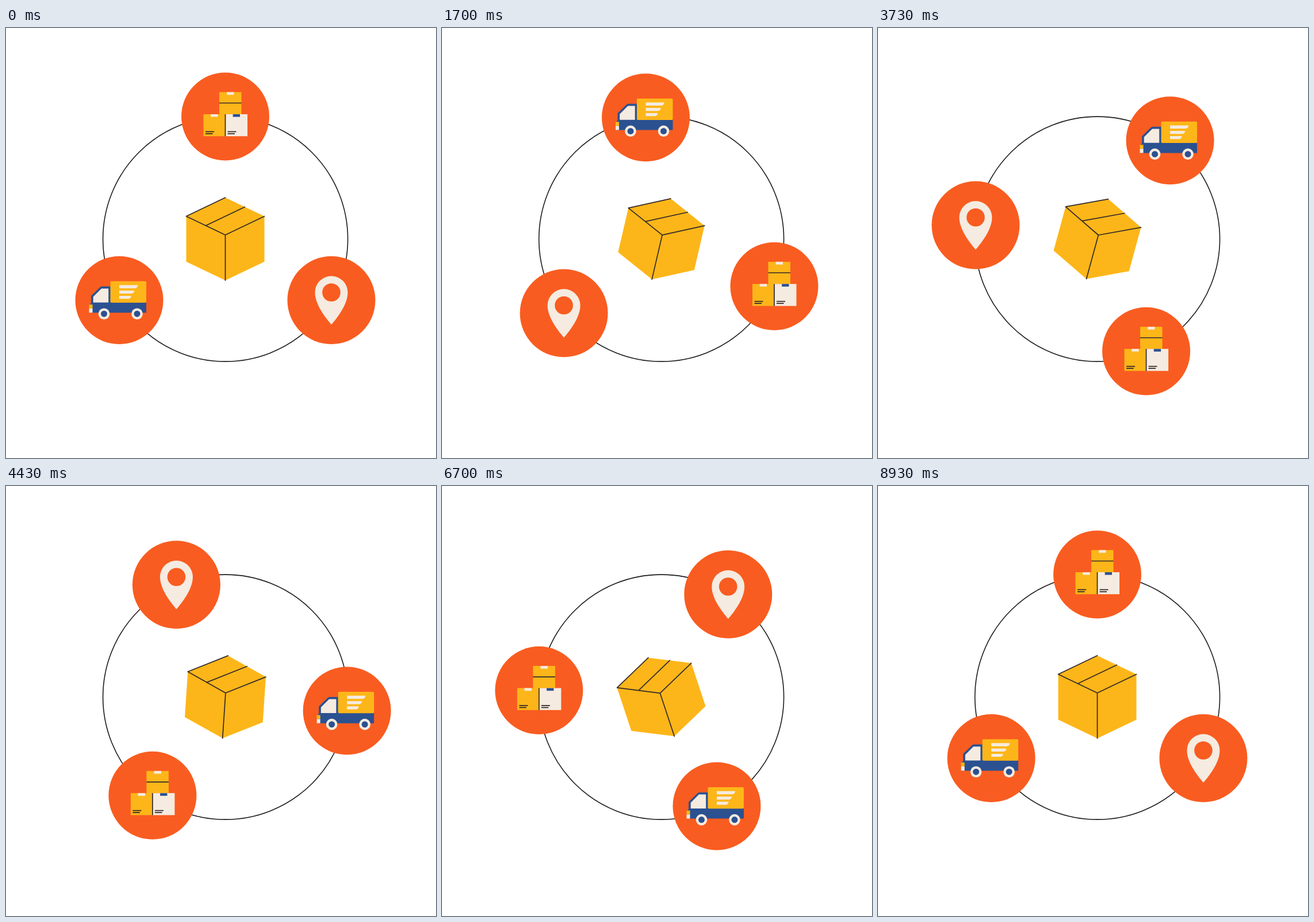
Write an HTML page that moves like this. It is 748x748 px and loops after 9.01 s.

```html
<!DOCTYPE html>
<html lang="en">
<head>
<meta charset="utf-8">
<title>Delivery cycle</title>
<style>
  html, body { margin: 0; width: 100%; height: 100%; overflow: hidden; background: #fff; }
  svg { display: block; width: 100vw; height: 100vh; }
  .orange { fill: #f95c20; }
  .yellow { fill: #fdb619; }
  .cream { fill: #f5ebe0; }
  .blue { fill: #2b5191; }
  .line { fill: none; stroke: #33292a; stroke-width: 1.7; stroke-linecap: round; stroke-linejoin: round; }
</style>
</head>
<body>
<svg viewBox="0 0 748 748">
  <circle cx="381.6" cy="367.1" r="213" fill="none" stroke="#1c1a1b" stroke-width="1.6"/>

  <!-- Parcel, drawn around the ring centre -->
  <g id="parcel">
    <path class="yellow" d="M0-72 68-39.5V39.5L0 72-68 39.5V-39.5Z"/>
    <path class="line" d="M0-72-68-39.5 0-7 68-39.5M0-7V72M-34-23.2 34-55.7"/>
  </g>

  <!-- Stacked boxes -->
  <g class="badge">
    <circle class="orange" r="76.5"/>
    <path class="yellow" d="M-10.5-42.5H28V-4H-10.5ZM-38-4H0V34.2H-38Z"/>
    <path class="cream" d="M0-4H38.5V34.2H0ZM2.7-42.5H15V-37.8H2.7ZM-25.3-4H-13V.6H-25.3Z"/>
    <path class="blue" d="M13.2-4H25.5V.6H13.2Z"/>
    <path class="line" style="stroke-linecap:butt" d="M-10.5-23.5H28M0-4V34.2M-34.5 26.3H-19.5M-34.5 29.8H-22M4 26.3H19M4 29.8H16.5"/>
  </g>

  <!-- Map pin -->
  <g class="badge">
    <circle class="orange" r="76.5"/>
    <path class="cream" d="M0 42.5C-9 32-28.5 8-28.5-13.5A28.5 28.5 0 0 1 28.5-13.5C28.5 8 9 32 0 42.5Z"/>
    <circle class="orange" cy="-13.5" r="15.8"/>
  </g>

  <!-- Truck -->
  <g class="badge">
    <circle class="orange" r="76.5"/>
    <path class="blue" d="M-49 5V-7.5L-33-23Q-32-24-30-24H-14V4H47V21.7H-52V8Z"/>
    <path class="cream" d="M-45.3 4V-6L-31-20.3H-18.8V4Z"/>
    <rect class="yellow" x="-15.5" y="-33" width="62.5" height="37.3" rx="1.8"/>
    <path class="cream" d="M0-26.2H32.3Q31.5-21 27-20.7H0ZM0-16.7H26.3Q25.5-11.7 21.5-11.4H0ZM0-7.6H20.6Q20-2.8 16-2.5H0Z"/>
    <path class="yellow" d="M-52.5 7.5H-46.5V14.5H-52.5Z"/>
    <path class="cream" d="M-52.5 14.5H-46.5V21.7H-52.5Z"/>
    <g class="cream"><circle cx="-26.5" cy="23.7" r="9.8"/><circle cx="31" cy="23.7" r="9.8"/></g>
    <g class="blue"><circle cx="-26.5" cy="23.7" r="5.5"/><circle cx="31" cy="23.7" r="5.5"/></g>
  </g>
</svg>
<script>
  const LOOP = 9010, LAST_STEP = 8930;
  const CENTER = { x: 381.5, y: 367 }, RADIUS = 213;

  // Keys are [time in ms, angle in degrees], clockwise
  const orbitKeys = [[0, 0], [2000, 120], [2998, 120], [4998, 240], [6028, 240], [7973, 360]];
  const rockKeys = [[0, 0], [2810, 20], [3058, 20], [6204, -20], [9000, 0]];

  const parcel = document.getElementById("parcel");
  const badges = [...document.querySelectorAll(".badge")];

  const smooth = x => x * x * (3 - 2 * x);

  function angleAt(keys, time) {
    const next = keys.findIndex(key => key[0] > time);
    if (next < 0) return keys[keys.length - 1][1];
    const [t0, a0] = keys[next - 1], [t1, a1] = keys[next];
    return a0 + (a1 - a0) * smooth((time - t0) / (t1 - t0));
  }

  // Poses change at 0 and 30 ms of every 100 ms
  function stepTime(time) {
    const base = Math.floor(time / 100) * 100;
    return Math.min(LAST_STEP, base + (time - base >= 30 ? 30 : 0));
  }

  function draw(time) {
    const t = stepTime(time % LOOP);
    const orbit = angleAt(orbitKeys, t);
    parcel.setAttribute("transform",
      `translate(${CENTER.x} ${CENTER.y}) rotate(${angleAt(rockKeys, t)})`);
    badges.forEach((badge, i) => {
      const a = (orbit + i * 120) * Math.PI / 180;
      const x = CENTER.x + RADIUS * Math.sin(a), y = CENTER.y - RADIUS * Math.cos(a);
      badge.setAttribute("transform", `translate(${x} ${y})`);
    });
  }

  const start = performance.now();
  function tick() {
    draw(performance.now() - start);
    requestAnimationFrame(tick);
  }
  tick();
</script>
</body>
</html>
```
